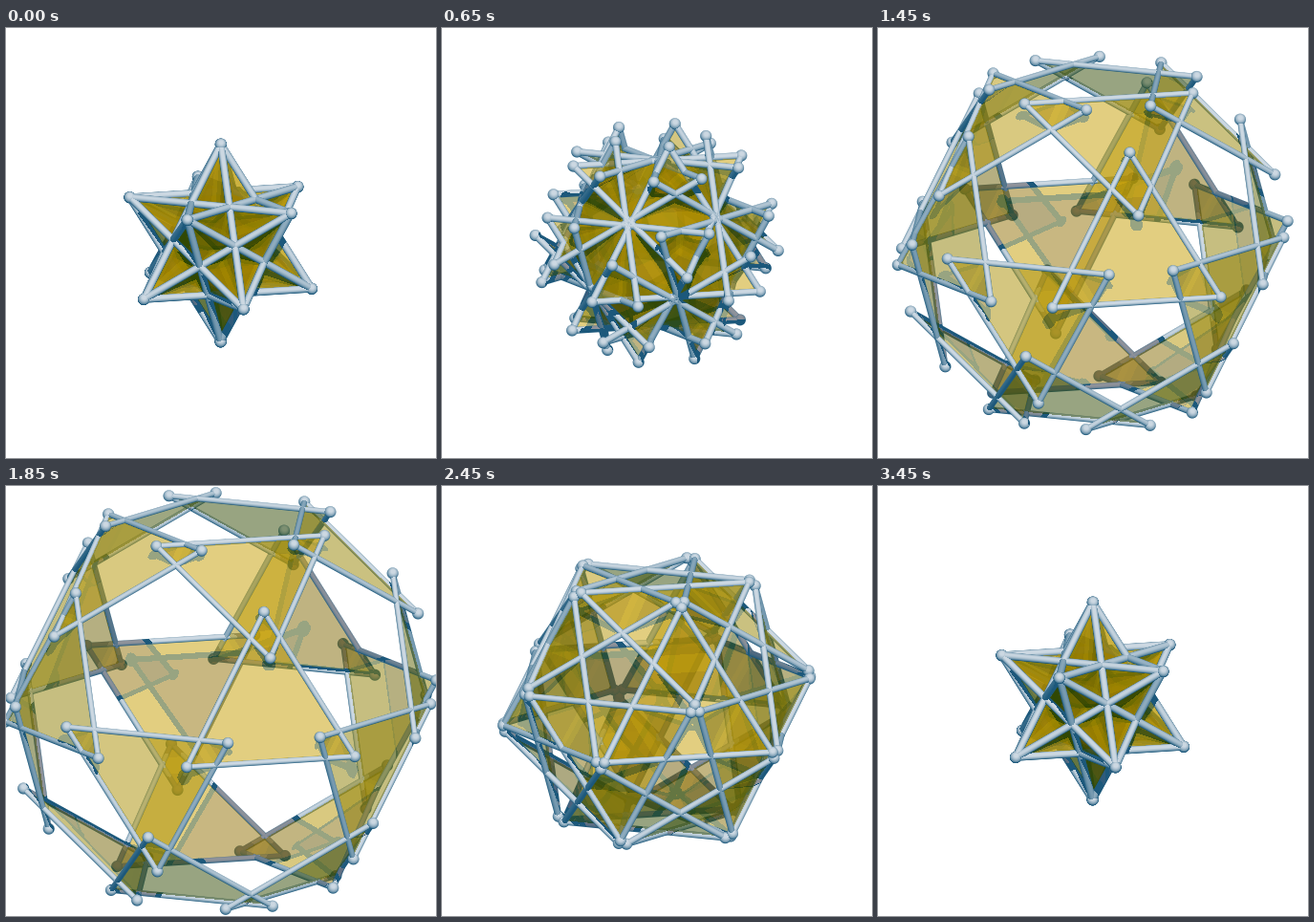
These frames come from a looping animation (450x450 px, 3500 ms). An HTML page with a canvas:

```html
<!DOCTYPE html>
<html lang="en">
<head>
<meta charset="utf-8">
<title>Exploding great icosahedron</title>
<style>
html, body { margin: 0; width: 100%; height: 100%; overflow: hidden; background: #fff; }
canvas { display: block; width: 450px; height: 450px; }
</style>
</head>
<body>
<canvas id="stage" width="450" height="450"></canvas>
<script>
const SIZE = 450, CX = 224.7, CY = 225;
const RADIUS = 106.7, BALL = 6, STEP = 6.55;
const FRAME_MS = 50, FRAMES = 70, PEAK = 30;
const PHI = (1 + Math.sqrt(5)) / 2;

// Orthographic view: screen right, screen down, toward the viewer.
const VIEW = [[-.1303, .9683, .2131], [-.9509, -.0613, -.3033], [-.2807, -.2422, .9291]];
const LIGHT = [.075, -.337, .939];
const TRANSMIT = [.65, .45, .3];

const dot = (a, b) => a[0] * b[0] + a[1] * b[1] + a[2] * b[2];
const scale = (a, s) => a.map(c => c * s);
const add = (a, b, s = 1) => a.map((c, i) => c + b[i] * s);
const unit = a => scale(a, 1 / Math.hypot(...a));
const project = v => VIEW.map(row => dot(row, unit(v)));
const clamp = v => Math.max(0, Math.min(1, v));

// All sign choices of (0, a, b), in its three cyclic positions.
function cyclic(a, b) {
  const out = [];
  for (const s of [a, -a]) for (const t of [b, -b]) out.push([0, s, t], [t, 0, s], [s, t, 0]);
  return out;
}

const corners = cyclic(1, PHI).map(project);
const normals = cyclic(PHI, 1 / PHI);
for (const x of [1, -1]) for (const y of [1, -1]) for (const z of [1, -1]) normals.push([x, y, z]);

const INNER = Math.sqrt((1 - 2 / Math.sqrt(5)) / 3) * RADIUS;
const CIRCUM = Math.sqrt(RADIUS * RADIUS - INNER * INNER);
const faces = normals.map(project).map(n => {
  const verts = corners.filter(v => Math.abs(dot(v, n) - INNER / RADIUS) < .05);
  return { n, lit: dot(n, LIGHT), arms: verts.map(v => unit(add(v, n, -dot(v, n)))) };
});

// Distance of the faces from the centre and radius of the bars at the current step.
let dist = INNER, bar = 3;

// Fragments are kept in one depth-sorted linked list per pixel, farthest first.
const MAX = 600000;
const head = new Int32Array(SIZE * SIZE), next = new Int32Array(MAX);
const depth = new Float32Array(MAX), alpha = new Float32Array(MAX);
const red = new Float32Array(MAX), green = new Float32Array(MAX), blue = new Float32Array(MAX);
let count = 1;

function emit(x, y, z, r, g, b, a) {
  if (count >= MAX) return;
  const cell = y * SIZE + x, id = count++;
  depth[id] = z; alpha[id] = a;
  red[id] = r; green[id] = g; blue[id] = b;
  let prev = 0, node = head[cell];
  while (node && depth[node] < z) { prev = node; node = next[node]; }
  next[id] = node;
  if (prev) next[prev] = id; else head[cell] = id;
}

function eachPixel(points, pad, visit) {
  const xs = points.map(p => p[0] + CX), ys = points.map(p => p[1] + CY);
  const x0 = Math.max(0, Math.floor(Math.min(...xs) - pad));
  const x1 = Math.min(SIZE - 1, Math.ceil(Math.max(...xs) + pad));
  const y0 = Math.max(0, Math.floor(Math.min(...ys) - pad));
  const y1 = Math.min(SIZE - 1, Math.ceil(Math.max(...ys) + pad));
  for (let y = y0; y <= y1; y++)
    for (let x = x0; x <= x1; x++) visit(x, y, x + .5 - CX, y + .5 - CY);
}

// Number of faces between a point and the light, or -1 behind a bar or ball.
function layersAbove(x, y, z, own) {
  let layers = 0;
  for (const face of faces) {
    if (face === own) continue;
    const n = face.n;
    const t = (dist - n[0] * x - n[1] * y - n[2] * z) / face.lit;
    if (t < 2 * bar + 1 || t > 900) continue;
    const hx = x + t * LIGHT[0], hy = y + t * LIGHT[1], hz = z + t * LIGHT[2];
    const inPlane = hx * hx + hy * hy + hz * hz - dist * dist;
    if (inPlane > (CIRCUM + BALL) ** 2) continue;
    const [a, b, c] = face.arms;
    const u = a[0] * hx + a[1] * hy + a[2] * hz;
    const v = b[0] * hx + b[1] * hy + b[2] * hz;
    const w = c[0] * hx + c[1] * hy + c[2] * hz;
    const inside = CIRCUM / 2 + Math.min(u, v, w);
    const toBall = inPlane + CIRCUM * (CIRCUM - 2 * Math.max(u, v, w));
    if (toBall < BALL * BALL || Math.abs(inside) < bar) return -1;
    if (inside > 0) layers++;
  }
  return layers;
}

function emitLit(x, y, px, py, z, k, dark, bright, cover, own) {
  const layers = k > 0 ? layersAbove(px, py, z, own) : -1;
  const [r, g, b] = dark.map((c, i) =>
    layers < 0 ? c : c + (bright[i] - c) * k * TRANSMIT[i] ** layers);
  emit(x, y, z, r, g, b, cover);
}

const STEEL = [[28, 88, 123], [204, 216, 226]];
const GOLD = [[48, 72, 3], [198, 158, 0]];

function emitSolid(x, y, px, py, z, nx, ny, nz, cover, own) {
  const k = clamp((nx * LIGHT[0] + ny * LIGHT[1] + nz * LIGHT[2]) * 1.05);
  emitLit(x, y, px, py, z, k, ...STEEL, cover, own);
}

function drawBall(p, own) {
  eachPixel([p], BALL + 1, (x, y, px, py) => {
    const dx = px - p[0], dy = py - p[1], r = Math.hypot(dx, dy);
    const cover = clamp(BALL + .5 - r);
    if (!cover) return;
    const h = Math.sqrt(Math.max(0, 1 - r * r / BALL / BALL));
    emitSolid(x, y, px, py, p[2] + h * BALL, dx / BALL, dy / BALL, h, cover, own);
  });
}

function drawBar(a, b, own) {
  const axis = add(b, a, -1), flat = Math.hypot(axis[0], axis[1]), full = Math.hypot(...axis);
  if (flat < 1) return;
  const ux = axis[0] / flat, uy = axis[1] / flat, rise = axis[2] / full, lean = flat / full;
  eachPixel([a, b], bar + 1, (x, y, px, py) => {
    const dx = px - a[0], dy = py - a[1], w = dy * ux - dx * uy;
    const cover = clamp(bar + .5 - Math.abs(w));
    if (!cover) return;
    const s = w / bar, h = Math.sqrt(Math.max(0, 1 - s * s));
    const along = dx * ux + dy * uy + bar * h * rise;
    if (along < 0 || along > flat) return;
    const z = a[2] + along / flat * axis[2] + bar * h * lean;
    emitSolid(x, y, px, py, z, -uy * s - rise * ux * h, ux * s - rise * uy * h, lean * h,
      cover, own);
  });
}

function drawFace(face, verts) {
  const n = face.n, [a, b, c] = face.arms, half = CIRCUM / 2;
  if (Math.abs(n[2]) < .02) return;
  const k = clamp((n[2] > 0 ? face.lit : -face.lit) * 1.3);
  // The side turned from the light is lit through the face itself only faintly.
  const shade = n[2] > 0 ? k : Math.max(k, clamp(Math.abs(face.lit)));
  eachPixel(verts, 0, (x, y, px, py) => {
    const z = (dist - n[0] * px - n[1] * py) / n[2];
    if (half + a[0] * px + a[1] * py + a[2] * z < 0) return;
    if (half + b[0] * px + b[1] * py + b[2] * z < 0) return;
    if (half + c[0] * px + c[1] * py + c[2] * z < 0) return;
    emitLit(x, y, px, py, z, shade, ...GOLD, .5, face);
  });
}

function render(step) {
  dist = INNER + step * STEP;
  bar = 3.8 - .9 * step / PEAK;
  head.fill(0);
  count = 1;
  for (const face of faces) {
    const verts = face.arms.map(a => add(scale(a, CIRCUM), face.n, dist));
    drawFace(face, verts);
    verts.forEach((v, i) => {
      drawBar(v, verts[(i + 1) % 3], face);
      drawBall(v, face);
    });
  }
  const image = new ImageData(SIZE, SIZE), data = image.data;
  for (let cell = 0; cell < head.length; cell++) {
    let r = 255, g = 255, b = 255;
    for (let id = head[cell]; id; id = next[id]) {
      const k = alpha[id];
      r += (red[id] - r) * k;
      g += (green[id] - g) * k;
      b += (blue[id] - b) * k;
    }
    data[cell * 4] = r;
    data[cell * 4 + 1] = g;
    data[cell * 4 + 2] = b;
    data[cell * 4 + 3] = 255;
  }
  return image;
}

const ctx = document.getElementById('stage').getContext('2d');
const cache = [];
let shown = -1;

function tick(now) {
  const frame = Math.floor(now / FRAME_MS) % FRAMES;
  const step = Math.max(0, PEAK - Math.abs(FRAMES / 2 - frame));
  if (step !== shown) {
    cache[step] = cache[step] || render(step);
    ctx.putImageData(cache[step], 0, 0);
    shown = step;
  }
  requestAnimationFrame(tick);
}
tick(0);
</script>
</body>
</html>
```
